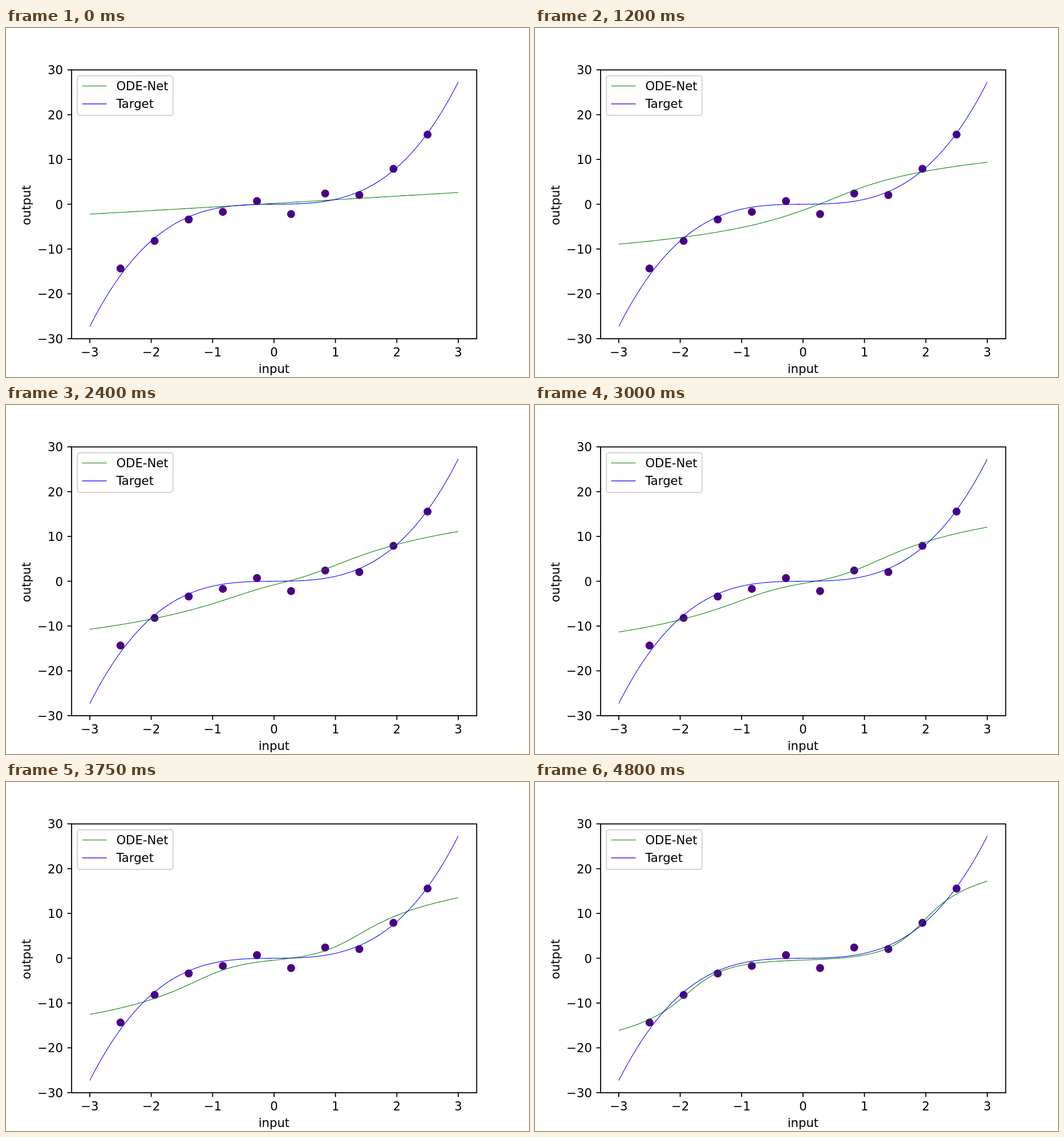
Write an HTML page with a canvas that moves like this. It is 917 px wide and 611 px high and loops after 4950 ms.

```html
<!DOCTYPE html>
<html lang="en">
<head>
<meta charset="utf-8">
<title>Curve fitting</title>
<style>
html, body { margin: 0; width: 100%; height: 100%; overflow: hidden; background: #fff; }
canvas { display: block; }
</style>
</head>
<body>
<canvas id="chart" width="917" height="611"></canvas>
<script>
const ctx = document.getElementById('chart').getContext('2d');
const LOOP = 4950, STEP = 150;
const LEFT = 115, RIGHT = 825.3, TOP = 73.4, BOTTOM = 544;
const GREEN = '#008000', BLUE = '#0000ff';
const px = x => 469.95 + x * 107.68;
const py = y => 308.55 - y * 7.842;

// Noisy samples at ten even inputs from -2.5 to 2.5
const samples = [-14.35, -8.2, -3.4, -1.7, 0.7, -2.2, 2.4, 2.05, 7.9, 15.55];

// The fit in inverse form: an asinh flattens its middle, a sinh bends its tails
const poses = [
  { t: 0,    shift: 0.69, flat: 0,    core: 2,    tail: 12.3,  bend: 10 },
  { t: 600,  shift: 0.36, flat: 0,    core: 2,    tail: 0.42,  bend: 3.1 },
  { t: 1800, shift: 0.36, flat: 0.15, core: 2,    tail: 0.92,  bend: 5.5 },
  { t: 3000, shift: 0.13, flat: 0.33, core: 1,    tail: 0.38,  bend: 5 },
  { t: 3750, shift: 0.07, flat: 0.37, core: 0.6,  tail: 0.19,  bend: 4.6 },
  { t: 4800, shift: 0.02, flat: 0.43, core: 0.23, tail: 0.024, bend: 3.9 }
];

function poseAt(t) {
  const i = Math.max(1, poses.findIndex(p => p.t >= t));
  const a = poses[i - 1], b = poses[i], u = (t - a.t) / (b.t - a.t);
  const mix = k => a[k] + (b[k] - a[k]) * u;
  const scale = k => a[k] * (b[k] / a[k]) ** u;
  return { shift: mix('shift'), flat: mix('flat'),
    core: scale('core'), tail: scale('tail'), bend: scale('bend') };
}

const fitInput = (y, p) => p.shift + p.flat * Math.asinh((y + 0.4) / p.core)
  + p.tail * Math.sinh((y - 0.75) / p.bend);

function line(points, color, width) {
  ctx.beginPath();
  points.forEach(p => ctx.lineTo(...p));
  ctx.strokeStyle = color;
  ctx.lineWidth = width;
  ctx.stroke();
}

// Draws the curve point(s) for s from -size to size, kept within inputs -3 to 3
function plot(point, size, color) {
  const points = [];
  for (let i = -400; i <= 400; i++) {
    const [x, y] = point(i / 400 * size);
    points.push([px(x), py(y)]);
  }
  ctx.save();
  ctx.beginPath();
  ctx.rect(px(-3), TOP, px(3) - px(-3), BOTTOM - TOP);
  ctx.clip();
  line(points, color, 1.06);
  ctx.restore();
}

function text(s, x, y, align = 'center') {
  ctx.textAlign = align;
  ctx.fillStyle = '#000';
  ctx.fillText(s, x, y);
}

const label = n => String(n).replace('-', '\u2212');

function drawAxes() {
  ctx.strokeStyle = '#000';
  ctx.lineWidth = 1.8;
  ctx.strokeRect(LEFT, TOP, RIGHT - LEFT, BOTTOM - TOP);
  for (let i = -3; i <= 3; i++) {
    const x = px(i), y = py(i * 10);
    line([[x, BOTTOM], [x, BOTTOM + 7.4]], '#000', 1.8);
    line([[LEFT, y], [LEFT - 7.4, y]], '#000', 1.8);
    text(label(i), x, 575);
    text(label(i * 10), 100, y + 8, 'right');
  }
  text('input', 469.9, 603.8);
  ctx.save();
  ctx.translate(42.8, 310.2);
  ctx.rotate(-Math.PI / 2);
  text('output', 0, 0);
  ctx.restore();
}

function drawLegend() {
  ctx.beginPath();
  ctx.roundRect(125.2, 83.6, 167.6, 69.4, 4.2);
  ctx.fillStyle = 'rgba(255,255,255,.8)';
  ctx.fill();
  ctx.strokeStyle = 'rgba(204,204,204,.8)';
  ctx.lineWidth = 2.1;
  ctx.stroke();
  [['ODE-Net', GREEN, 101.5], ['Target', BLUE, 132.9]].forEach(([name, color, y]) => {
    line([[133.7, y], [176.5, y]], color, 1.06);
    text(name, 193.4, y + 7.3, 'left');
  });
}

function draw(now) {
  let step = Math.floor(now % LOOP / STEP);
  if (step === 19) step = 18; // the picture holds here for two steps
  const pose = poseAt(step * STEP);

  ctx.fillStyle = '#fff';
  ctx.fillRect(0, 0, 917, 611);
  ctx.font = '21.2px "DejaVu Sans", sans-serif';
  ctx.fillStyle = '#4b0082';
  samples.forEach((y, i) => {
    ctx.beginPath();
    ctx.arc(px(i * 5 / 9 - 2.5), py(y), 7, 0, Math.PI * 2);
    ctx.fill();
  });
  plot(y => [fitInput(y, pose), y], 20, GREEN);
  plot(x => [x, x ** 3 + x / 10], 3, BLUE);
  drawAxes();
  drawLegend();
}

const start = performance.now();
function tick() {
  draw(performance.now() - start);
  requestAnimationFrame(tick);
}
tick();
</script>
</body>
</html>
```
